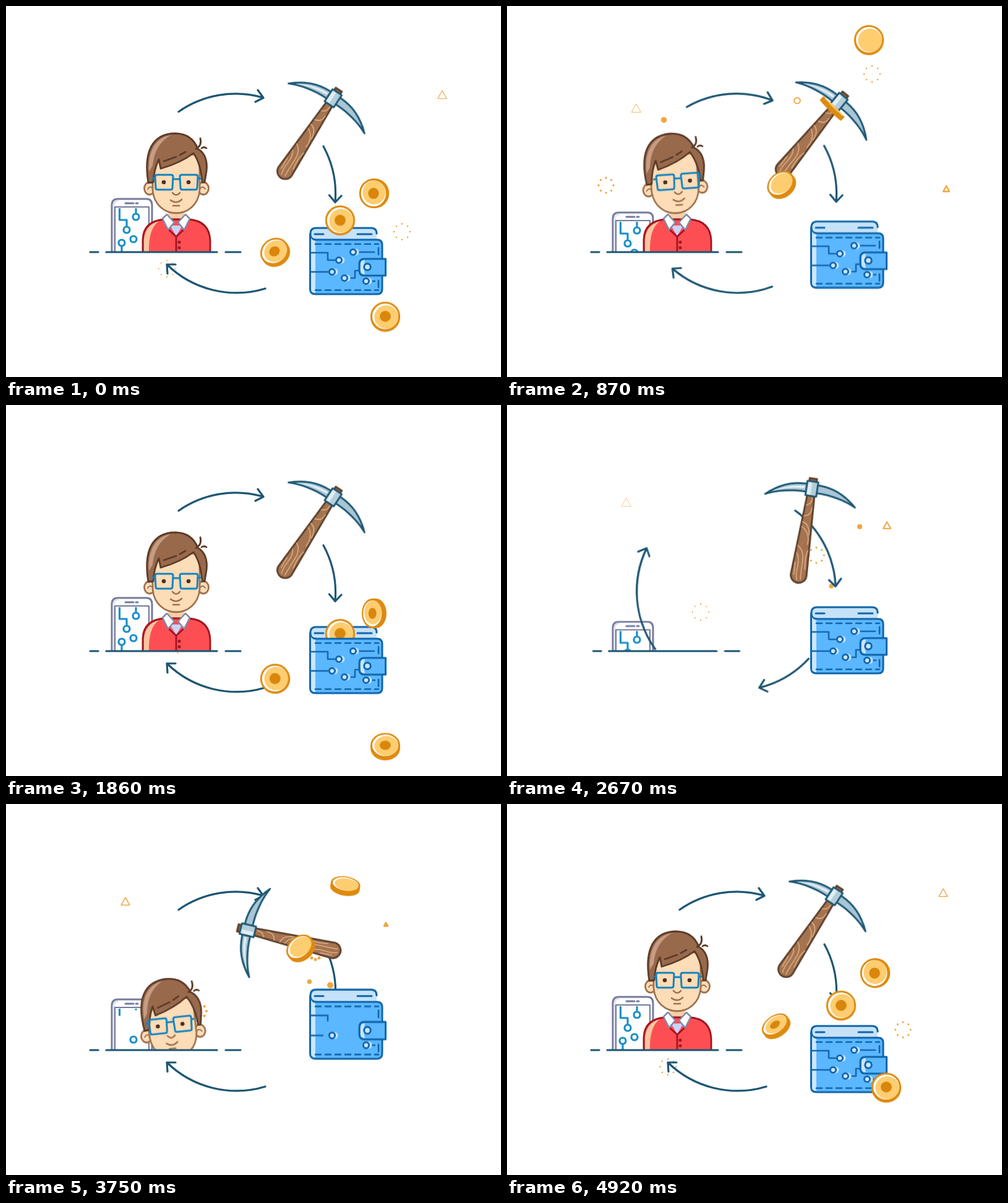
An HTML page for the animation above (4950 ms loop, 800 px wide and 600 px high).

```html
<!DOCTYPE html>
<html lang="en">
<head>
<meta charset="utf-8">
<title>Mining cycle</title>
<style>
html, body { margin: 0; width: 100%; height: 100%; overflow: hidden; background: #fff; }
svg { display: block; width: 800px; height: 600px; }
path, circle, rect { stroke-linejoin: round; }
g { stroke-linecap: round; }

.pick, .wallet, .phone, .man, .head, .face, .eye, .arrow, .ground, .trace, .node {
  animation: 4950ms ease-in-out infinite;
}
.pick { animation-name: swing; transform-origin: 479px 225px; }
.wallet { animation-name: hop; transform-origin: 550px 466px; }
.phone { animation-name: slide; --rest: .72; }
.man { animation-name: rise; }
.head { animation-name: tilt; transform-origin: 275px 345px; }
.face { animation-name: look; }
.eye { animation-name: blink; transform-origin: 275px 285px; }
.arrow { animation-name: spin; transform-origin: 372.6px 300.9px; }
.ground { animation-name: squeeze; transform-origin: 257.5px 398px; }
.trace { animation-name: draw; stroke-dasharray: 1 2; stroke-linecap: butt; }
.node { animation-name: fade; }

@keyframes swing {
  0%, 6%, 23%, 48.5%, 86%, 100% { transform: rotate(0); }
  12.4% { transform: rotate(-40deg); }
  17.58% { transform: rotate(6deg); }
  53.94% { transform: rotate(-24.6deg); }
  62% { transform: rotate(-115deg); }
  68% { transform: rotate(-100deg); }
  75.76% { transform: rotate(-110deg); }
  80.6% { transform: rotate(6deg); }
}
@keyframes hop {
  0%, 10%, 23%, 48.5%, 84%, 100% { transform: none; }
  17.58% { transform: translateY(-10.5px); }
  53.94% { transform: translateY(-32px); }
  62%, 75.76% { transform: translateY(-54px) scaleY(1.045); }
  81% { transform: translateY(4px) scaleY(.98); }
}
@keyframes slide {
  0%, 10%, 24%, 48.5%, 79%, 100% { transform: translateY(0); }
  17.58% { transform: translateY(22px); }
  53.94% { transform: translateY(38.5px); }
  58%, 68.7% { transform: translateY(95px); }
  75.76% { transform: translateY(4px); }
}
@keyframes rise {
  0%, 48.5%, 84%, 100% { transform: translateY(0); }
  53%, 72% { transform: translateY(210px); }
  75.76% { transform: translateY(76px); }
  81% { transform: translateY(-4px); }
}
@keyframes tilt {
  0%, 10%, 24%, 60%, 84%, 100% { transform: rotate(0); }
  17.58% { transform: rotate(-4deg); }
  72%, 75.76% { transform: rotate(-6deg); }
}
@keyframes look {
  0%, 10%, 24%, 60%, 84%, 100% { transform: translate(0, 0); }
  17.58% { transform: translate(5px, -1px); }
  75.76% { transform: translate(-3px, -4px); }
}
@keyframes blink {
  0%, 89.5%, 94%, 100% { transform: scaleY(1); }
  90.9% { transform: scaleY(.65); }
  92% { transform: scaleY(.1); }
}
@keyframes spin {
  0%, 10%, 25% { transform: rotate(0); }
  17.58% { transform: rotate(var(--wobble)); }
  49% { transform: rotate(0); animation-timing-function: ease-in; }
  53.94% { transform: rotate(70.8deg); animation-timing-function: ease-out; }
  70%, 100% { transform: rotate(360deg); }
}
@keyframes squeeze {
  0%, 51%, 66%, 100% { transform: scaleX(1); }
  53.94%, 58% { transform: scaleX(.972); }
}
@keyframes draw {
  0%, 57%, 82%, 100% { stroke-dashoffset: 0; }
  66% { stroke-dashoffset: 1; }
  75.76% { stroke-dashoffset: var(--rest, .3); }
}
@keyframes fade {
  0%, 57%, 80%, 100% { opacity: 1; }
  62%, 76.5% { opacity: 0; }
}
</style>
</head>
<body>
<svg viewBox="0 0 800 600">
  <defs>
    <clipPath id="above"><rect x="100" y="0" width="300" height="398"/></clipPath>
    <g id="node"><circle cx="4" r="5.500" fill="#bfe1fb" stroke="none"/><circle r="4.600" fill="#cde8fc" stroke="#1769b0" stroke-width="3"/></g>
    <circle id="dot" r="5" fill="#fff" stroke="#1b90c8" stroke-width="3.2"/>
  </defs>

  <g id="sparks" fill="none" stroke="#f0a640"></g>

  <g clip-path="url(#above)">
    <g class="phone" fill="none" stroke="#757b9c" stroke-width="3">
      <path d="M171 402V322Q171 312 181 312H227Q236 312 236 322V402" fill="#fff"/>
      <path d="M174 398V321Q175 315 181 315" stroke="#e2e4ee"/>
      <path d="M176 402V325H231V402" stroke-width="2.2"/>
      <path d="M193 319H206M210 319H213"/>
      <g stroke="#1b90c8" stroke-width="3.2">
        <path class="trace" pathLength="1" d="M183.5 327V346H195V357"/>
        <path class="trace" pathLength="1" d="M210 327V336"/>
        <path class="trace" pathLength="1" d="M187 400V388"/>
      </g>
      <g class="node"><use href="#dot" x="195" y="362"/><use href="#dot" x="210" y="341"/><use href="#dot" x="187" y="383"/></g>
      <use href="#dot" x="206" y="377"/>
    </g>

    <g class="man" fill="none" stroke="#a0714b" stroke-width="2.8">
      <path d="M262 325H288V352L275 366L262 352Z" fill="#f6cfa6" stroke="none"/>
      <path d="M221 402V378Q222 347 257 345H294Q329 347 330 380V402Z" fill="#fd4f53" stroke="#a3141f"/>
      <path d="M223 398V378Q225 354 247 348Q230 360 231 398Z" fill="#f8c6a0" stroke="none"/>
      <path d="M262 350L275 372L288 350L282 355H268Z" fill="#c9d3fb" stroke="none"/>
      <path d="M262 361L275 373L288 361M275 373V398" stroke="#a3141f"/>
      <g fill="#a3141f" stroke="none"><circle cx="280" cy="382" r="2.5"/><circle cx="280" cy="391" r="2.5"/></g>
      <path d="M260 337L253 344L262 362L272 350ZM290 337L297 344L288 362L278 350Z" fill="#fff" stroke="#8089aa" stroke-width="2.5"/>
      <g class="head">
        <ellipse cx="232" cy="295" rx="8.5" ry="10" fill="#fddcb8"/>
        <ellipse cx="319" cy="295" rx="8.5" ry="10" fill="#fddcb8"/>
        <path d="M229 296Q233 290 237 295M322 296Q318 290 314 295" stroke-width="2"/>
        <path d="M237 255V298C239 322 257 335 275 335S311 322 313 298V240H245Z" fill="#fddcb8"/>
        <path d="M230 286C222 238 235 206 274 206Q301 207 310 231Q327 241 324 267L321 285H317Q315 255 303 238Q282 254 250 263L247 248Q239 264 238 285Z" fill="#99694c" stroke="#5b3b27"/>
        <path d="M231 268C229 234 243 212 266 209Q240 224 237 258Z" fill="#c69c83" stroke="none"/>
        <path d="M255 251L275 244M281 241L290 236M307 231Q317 226 314 214M316 230Q320 227 324 230" stroke="#5b3b27"/>
        <g class="face">
          <path d="M269 302Q275 309 281 302M266 314Q275 321 284 313M270 323H280" stroke-width="2.6"/>
          <g class="eye" fill="#4c2f20" stroke="none"><circle cx="255" cy="285" r="3.3"/><circle cx="295" cy="285" r="3.3"/></g>
          <path d="M244 273H267Q270 273 270 276L269 294Q269 297 266 297H245Q242 297 242 294L241 276Q241 273 244 273ZM284 273H307Q310 273 310 276L309 294Q309 297 306 297H285Q282 297 282 294L281 276Q281 273 284 273ZM270 280H281M237 279H241M310 279H314" stroke="#1384bf" stroke-width="3"/>
        </g>
      </g>
    </g>
  </g>

  <g fill="none" stroke="#1d5673" stroke-width="3.2">
    <path class="ground" d="M136 398H149M162 398H341M355 398H379"/>
    <path class="arrow" style="--wobble:5deg" d="M279 171A161 161 0 0 1 415 148M407 136L416 148.500L403 155"/>
    <path class="arrow" style="--wobble:-.3deg" d="M513 227A161 161 0 0 1 532 317M522.500 306L532 317.500L542 307"/>
    <path class="arrow" style="--wobble:-3.5deg" d="M419 457A161 161 0 0 1 260 418M274 418H260L261 433"/>
  </g>

  <g class="pick">
    <g transform="translate(479 225) rotate(33.3) translate(0 1.500) scale(.98)" fill="none" stroke="#5b412e" stroke-width="3">
      <path d="M-6 -103V-111H6V-103Z" fill="#8d5f3e"/>
      <path d="M-6 -82L-13 50A13 13 0 0 0 13 50L6 -82Z" fill="#a5734f"/>
      <path d="M-5 -66Q4 -70 3 -78M-6 -48Q6 -50 5 -63M-7 -30Q8 -22 7 -2M-7 -38Q5 -36 7 -18M-9 2Q3 8 3 28T4 57M-9 14Q-3 20 -4 36T-2 58M9 8Q5 18 9 40M-9 30L-8 50" stroke="#e0b48a" stroke-width="1.5"/>
      <path d="M-75 -74Q-44 -102 -8 -101V-88Q-46 -88 -75 -74ZM75 -74Q44 -102 8 -101V-88Q46 -88 75 -74Z" fill="#a9c6d5" stroke="#1f5975"/>
      <path d="M-64 -80Q-40 -96 -12 -97V-93Q-42 -91 -64 -80Z" fill="#e3eef3" stroke="none"/>
      <path d="M-9 -106H9V-82H-9Z" fill="#b4cfdc" stroke="#1f5975"/>
      <path d="M-7 -104H-1V-84H-7Z" fill="#e3eef3" stroke="none"/>
    </g>
  </g>

  <g class="wallet" fill="none" stroke="#1166aa" stroke-width="3">
    <path d="M492 384V368Q492 359 501 359H590Q599 359 599 368V380Z" fill="#c6e2f8" stroke="none"/>
    <path d="M492 378V368Q492 359 501 359H590Q599 359 599 368"/>
    <path d="M499 369H513M568 369H591"/>
  </g>
  <g id="inside"></g>
  <g class="wallet" fill="none" stroke="#1166aa" stroke-width="3">
    <path d="M491.500 369Q492 378 502 378H600Q608 378 608 386V458Q608 466 600 466H500Q491.500 466 491.500 458Z" fill="#5bb7ff"/>
    <path d="M493 375Q495 379 500 380V464Q493 464 493 458Z" fill="#cbe6fb" stroke="none"/>
    <path d="M500 385H602M500 459.500H602" stroke-dasharray="9 7" stroke-width="2.6"/>
    <path d="M602 391V402M602 444V455" stroke-width="2.6"/>
    <g stroke="#1769b0" stroke-width="2.6">
      <path class="trace" pathLength="1" d="M492 399H520V411H533"/>
      <path class="trace" pathLength="1" d="M492 430H522"/>
      <path class="trace" pathLength="1" d="M597 445H588"/>
      <g class="node"><path d="M567 398H595M552 440H564V428H571"/></g>
    </g>
    <g class="node"><use href="#node" x="538" y="411"/><use href="#node" x="561" y="398"/><use href="#node" x="547" y="440"/></g>
    <use href="#node" x="527" y="430"/><use href="#node" x="582" y="445"/>
    <path d="M613.500 409H579Q571 409 571 417V428Q571 436 579 436H613.500Z" fill="#5bb7ff"/>
    <path d="M580 411Q573 411 573 418V427Q573 434 580 434Q577 423 580 411Z" fill="#cbe6fb" stroke="none"/>
    <circle cx="584" cy="422" r="5.300" fill="#cbe6fb"/>
  </g>
  <g id="outside"></g>
</svg>

<script>
const LOOP = 4950, SECOND_DROP = 1830, HANG = -450, SPARK_LIFE = 400;
const PICK = { x: 510, y: 190 };

function add(parent, markup) {
  const box = document.getElementById(parent);
  box.insertAdjacentHTML('beforeend', markup);
  return box.lastElementChild;
}
const set = (el, attrs) => Object.entries(attrs).forEach(([k, v]) => el.setAttribute(k, v));
const mix = (a, b, p) => a + (b - a) * p;
const clamp = p => Math.min(1, Math.max(0, p));
const easeOut = (p, power) => 1 - (1 - p) ** power;

// A coin leaves the pick at `start`, hangs at (x, y), then falls `fall` px by its drop.
// It shows its full face at `flat` and turns `spin` radians per second; `lead` makes it drop early.
const coins = [
  { x: 595, y: 144, fall: 158, hop: 120, start: -1320, spin: 16.8, flat: -15, toss: 100, tilt: 0 },
  { x: 435, y: 190, fall: 207, hop: -103, start: -1320, spin: 13.3, flat: 40, toss: 50, tilt: 55 },
  { x: 540, y: 236, fall: 110, hop: 64, start: -1060, spin: 4.9, flat: -10, toss: 135, tilt: 82, inside: true },
  { x: 613, y: 268, fall: 233, hop: 60, start: -800, spin: 14.3, flat: -10, toss: 90, tilt: 90 },
  { x: 543, y: 236, fall: 110, hop: 0, start: -500, spin: 4.9, flat: -220, toss: 165, tilt: 165, inside: true, lead: 450 },
];
for (const c of coins) {
  c.el = add(c.inside ? 'inside' : 'outside', `<g>
    <g fill="#de8a0f"><ellipse ry="24"/><rect y="-24" height="48"/></g>
    <g><circle r="24" fill="#de8a0f"/><circle r="21" fill="#fff"/>
    <circle cx="1" cy="-1.500" r="19.200" fill="#fdcd70"/><circle r="9" fill="#d9860c"/></g></g>`);
}

function moveCoin(c, time) {
  const t = time + (c.lead || 0), end = c.inside ? 90 : 220;
  const shown = t > c.start && t < end;
  c.el.style.display = shown ? '' : 'none';
  if (!shown) return;

  const p = clamp((t - c.start) / (HANG - c.start));
  const drop = Math.max(0, 1 - t / HANG) ** 3;
  const x = mix(PICK.x, c.x, easeOut(p, 4));
  const y = mix(PICK.y, c.y, p) - c.hop * Math.sin(Math.PI * p) + c.fall * drop;
  const size = clamp((t - c.start) / 100);
  const facing = Math.cos(c.spin * (t - c.flat) / 1000);
  const wide = Math.max(Math.abs(facing), .01), depth = 8 * Math.sqrt(1 - wide * wide);

  const [rim, face] = c.el.children, [disc, band] = rim.children;
  set(c.el, { transform: `translate(${x} ${y}) rotate(${mix(c.toss, c.tilt, p ** 3)}) scale(${size})` });
  set(disc, { cx: depth / 2, rx: 24 * wide });
  set(band, { x: -depth / 2, width: depth });
  set(face, { transform: `translate(${-depth / 2} 0) scale(${wide} 1)` });
  face.lastElementChild.style.display = facing > 0 && t > HANG ? '' : 'none';
}

const shapes = {
  triangle: { markup: '<path d="M0 -7.500L7.500 6H-7.500Z"/>', weight: 3.4 },
  ring: { markup: '<circle r="6"/>', weight: 3.4 },
  burst: { markup: '<circle r="13.500" pathLength="8" stroke-dasharray="0 1"/>', weight: 7 },
  dot: { markup: '<circle r="5" fill="#f0a640" stroke="none"/>', weight: 0 },
};
const sparks = [];
// Sparks pop one after another, `step` ms apart.
function sparkle(start, step, ...spots) {
  spots.forEach(([kind, x, y], i) => {
    const { markup, weight } = shapes[kind];
    sparks.push({ x, y, weight, start: start + i * step, el: add('sparks', markup) });
  });
}
sparkle(570, 45, ['triangle', 209, 166], ['burst', 590, 110], ['burst', 160, 290], ['ring', 469, 153], ['triangle', 710, 296]);
for (const start of [2340, 3530]) {
  sparkle(start, 55, ['triangle', 193, 158], ['burst', 313, 335], ['burst', 500, 243], ['triangle', 614, 195], ['dot', 524, 293]);
}
sparkle(4240, 60, ['ring', 503, 316], ['burst', 507, 343], ['triangle', 261, 167]);
sparkle(4670, 15, ['burst', 260, 425], ['triangle', 705, 144], ['burst', 640, 365]);

let seed = 7;
const random = () => (seed = seed * 16807 % 2147483647) / 2147483647;
for (let i = 0; i < 12; i++) {
  sparkle(500 + i * 350, 0, ['dot', 80 + 600 * random(), 100 + 400 * random()]);
}

function moveSpark({ x, y, weight, start, el }, t) {
  const p = (t - start + LOOP) % LOOP / SPARK_LIFE;
  const shown = p > 0 && p < 1;
  el.style.display = shown ? '' : 'none';
  if (!shown) return;
  const size = weight ? easeOut(p, 3) : 1 - p;
  set(el, { transform: `translate(${x} ${y}) scale(${size})`, 'stroke-width': weight * (1 - p) / size });
}

const begin = performance.now();
function frame() {
  const t = (performance.now() - begin) % LOOP;
  const drop = t < 400 ? 0 : t < 2300 ? SECOND_DROP : LOOP;
  coins.forEach(c => moveCoin(c, t - drop));
  sparks.forEach(s => moveSpark(s, t));
  requestAnimationFrame(frame);
}
frame();
</script>
</body>
</html>
```
